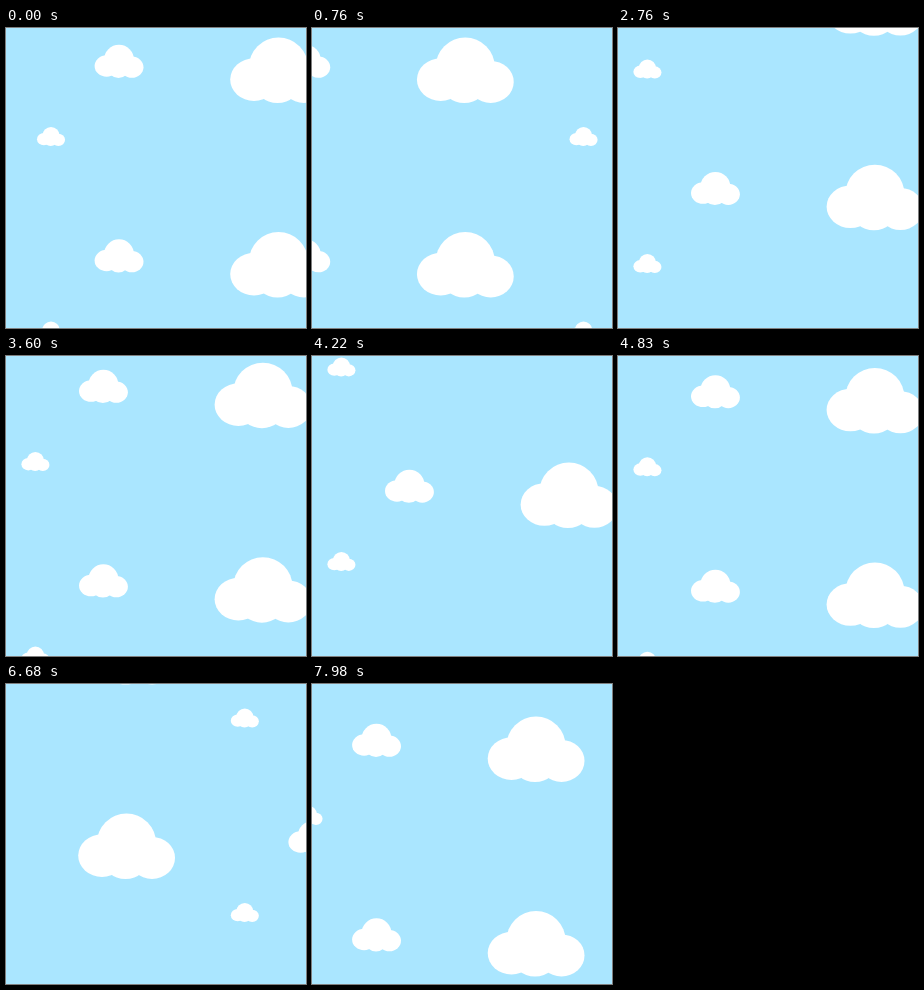
These frames come from a looping animation (300x300 px, 8 s). An HTML page with a canvas:

```html
<!DOCTYPE html>
<html lang="en">
<head>
<meta charset="utf-8">
<title>Drifting clouds</title>
<style>
  html, body { margin: 0; height: 100%; overflow: hidden; background: #aae6ff; }
  canvas { display: block; width: 100vw; height: 100vh; }
</style>
</head>
<body>
<canvas width="300" height="300"></canvas>
<script>
const ctx = document.querySelector('canvas').getContext('2d');
const SIZE = 300, LOOP = 8000, STEP = 76.76;
const TILE_W = 345.8, TILE_H = 194.5;

// Cloud lobes, measured from the top centre of the cloud.
const LOBES = [
  { x: 0, y: 29.5, rx: 29.6, ry: 29.5 },
  { x: -24.5, y: 42, rx: 23.8, ry: 21.3 },
  { x: 25.5, y: 44.3, rx: 23, ry: 21 },
  { x: -1, y: 45, rx: 23, ry: 20.5 }
];
const CLOUDS = [
  { x: 272.5, y: 9.6, scale: 1 },
  { x: 113, y: 16.8, scale: 0.505 },
  { x: 45, y: 99, scale: 0.29 }
];

// Corners of the path the sky follows: left, up, right, down.
const PATH = [
  { step: 0, x: 0, y: 0 },
  { step: 30.3, x: -361.4, y: 0 },
  { step: 69.5, x: -361.4, y: -463.5 },
  { step: 95.65, x: -48.5, y: -463.5 },
  { step: 104, x: -48.5, y: -366 }
];

const wrap = (value, period) => ((value % period) + period) % period;

function skyOffset(step) {
  const next = Math.max(1, PATH.findIndex(p => p.step >= step));
  const a = PATH[next - 1], b = PATH[next];
  const u = (step - a.step) / (b.step - a.step);
  return { x: a.x + (b.x - a.x) * u, y: a.y + (b.y - a.y) * u };
}

function drawCloud(x, y, scale) {
  for (const lobe of LOBES) {
    ctx.beginPath();
    ctx.ellipse(x + lobe.x * scale, y + lobe.y * scale,
      lobe.rx * scale, lobe.ry * scale, 0, 0, 2 * Math.PI);
    ctx.fill();
  }
}

function draw(time) {
  // The sky moves in discrete steps of about 13 per second.
  const step = Math.min(104, Math.floor((time % LOOP + 9) / STEP));
  const offset = skyOffset(step);
  ctx.fillStyle = '#aae6ff';
  ctx.fillRect(0, 0, SIZE, SIZE);
  ctx.fillStyle = '#fff';
  for (const { x, y, scale } of CLOUDS) {
    const left = wrap(x + offset.x, TILE_W) - TILE_W;
    const top = wrap(y + offset.y, TILE_H) - TILE_H;
    for (let cx = left; cx < SIZE + 50; cx += TILE_W)
      for (let cy = top; cy < SIZE; cy += TILE_H)
        drawCloud(cx, cy, scale);
  }
}

const start = performance.now();
function tick() {
  draw(performance.now() - start);
  requestAnimationFrame(tick);
}
tick();
</script>
</body>
</html>
```
